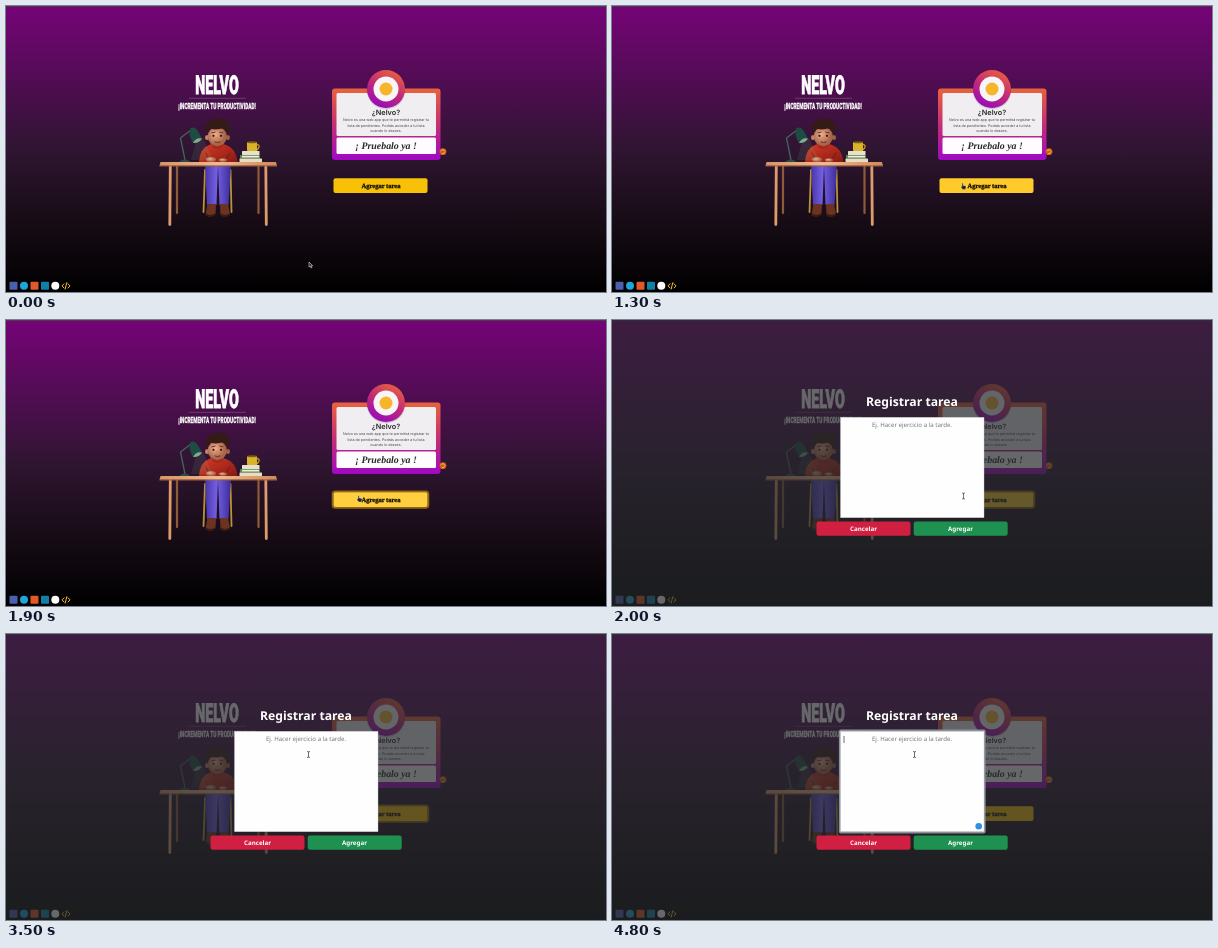
Write an HTML page that moves like this. It is 600x286 px and loops after 5.1 s.

```html
<!DOCTYPE html>
<html lang="es">
<head>
<meta charset="utf-8">
<style>
  html, body { margin: 0; width: 100%; height: 100%; overflow: hidden; background: #000; }
  svg { display: block; width: 100%; height: 100%; }
  text { text-anchor: middle; text-rendering: geometricPrecision; }
  .head { font-family: Roboto, sans-serif; font-weight: 900; fill: #fff; stroke: #fff; }
  .card { font-family: Inter, sans-serif; fill: #4a464c; }
  .script { font: italic bold 9.9px "Liberation Serif", serif; fill: #2a2a2a; }
  .display { font: bold 6.5px "Liberation Serif", serif; fill: #160f00; stroke: #160f00; stroke-width: .3; }
  .modal { font-family: "Noto Sans", "Open Sans", sans-serif; font-weight: 700; fill: #fff; }
  .line { fill: none; stroke-linecap: round; stroke-linejoin: round; }
</style>
</head>
<body>
<svg viewBox="0 0 600 286" preserveAspectRatio="none">
  <defs>
    <linearGradient id="sky" x2="0" y2="1"><stop stop-color="#760378"/><stop offset="0.5" stop-color="#2f1531"/><stop offset=".75" stop-color="#170c16"/><stop offset="1" stop-color="#000"/></linearGradient>
    <linearGradient id="warm" x2="0" y2="1"><stop stop-color="#e8623c"/><stop offset=".5" stop-color="#c62f72"/><stop offset="1" stop-color="#a008c6"/></linearGradient>
    <linearGradient id="halo" x1=".75" y1="0" x2=".25" y2="1"><stop stop-color="#e8623c"/><stop offset=".5" stop-color="#c22a78"/><stop offset="1" stop-color="#9408c0"/></linearGradient>
    <linearGradient id="wood" x2="1" y2="0"><stop stop-color="#d99468"/><stop offset=".5" stop-color="#f0b98c"/><stop offset="1" stop-color="#d18a5c"/></linearGradient>
    <linearGradient id="jean" x2="1" y2="0"><stop stop-color="#4635a8"/><stop offset=".45" stop-color="#7460e4"/><stop offset="1" stop-color="#3c2c98"/></linearGradient>
    <linearGradient id="wool" x2="1" y2="1"><stop stop-color="#dc3c26"/><stop offset="1" stop-color="#861a14"/></linearGradient>
    <radialGradient id="skin" cx=".4" cy=".4"><stop stop-color="#eeb08c"/><stop offset="1" stop-color="#a9654a"/></radialGradient>
  </defs>

  <rect width="600" height="286" fill="url(#sky)"/>
  <rect width="600" height="1" fill="#4b3a4d"/>

  <g class="head" transform="translate(211 0) scale(.55 1)">
    <text y="88.300" font-size="26" stroke-width=".9">NELVO</text>
    <text y="103.400" font-size="8.600" stroke-width=".3">¡INCREMENTA TU PRODUCTIVIDAD!</text>
  </g>
  <path d="M183 92.300H240" stroke="#7d4f80" stroke-width=".7"/>

  <!-- desk scene -->
  <g class="line" stroke="#b8923a" stroke-width="1.800">
    <path d="M199 164L197.500 206M224.500 164L225.500 206"/>
  </g>
  <g class="line" stroke-width="2.200">
    <path d="M171 160V207M252.500 160V207" stroke="#8f5a38"/>
    <path d="M164.300 160L163.800 218.500M259.800 160L260.300 218.500" stroke="#dc9c6c" stroke-width="2.800"/>
  </g>
  <path d="M199 159H212L210.500 199H201ZM212 159H225L222.500 199H213.500Z" fill="url(#jean)"/>
  <path d="M201.500 198H210L209.500 208Q205 213 199.500 209ZM214 198H222L224 208Q219 213 214.500 209Z" fill="#6d3322"/>
  <path d="M199.500 207Q204 211 209.500 207V209Q204 213 199.500 209ZM214.500 207Q219 211 224 207V209Q219 213 214.500 209Z" fill="#3b1a12"/>
  <path d="M203 139Q211 135 220 139Q230 142 231.500 156H193Q194 142 203 139Z" fill="url(#wool)"/>
  <path d="M206 137Q211 143 217 137L217 141Q211 145 206 141Z" fill="#a52a1c"/>
  <path class="line" d="M200 147L203 153M224 147L220 153" stroke="#74150f" stroke-width=".9"/>
  <ellipse cx="201" cy="131.500" rx="2" ry="2.600" fill="#c98262"/>
  <ellipse cx="222" cy="131.500" rx="2" ry="2.600" fill="#a06243"/>
  <ellipse cx="211.300" cy="130.500" rx="9.600" ry="9.700" fill="url(#skin)"/>
  <path d="M201 128.500Q197.500 119 203 116.500Q205 112 212 113.300Q220 112 222.500 118Q225 123 221.500 129Q221 123.500 216 122.500Q207 124.500 203.500 122Q202.500 126 201 128.500Z" fill="#351b16"/>
  <g fill="#241512"><circle cx="207.500" cy="129.800" r="1.100"/><circle cx="215" cy="129.800" r="1.100"/></g>
  <path class="line" d="M205.800 126.800L209 126.200M213.700 126.200L216.800 126.800M209 136Q211.500 137.200 214 136" stroke="#4a2118" stroke-width=".8"/>
  <circle cx="211" cy="132.500" r="1.700" fill="#d58562"/>
  <ellipse cx="205" cy="153.500" rx="5" ry="2.500" fill="url(#skin)"/>
  <ellipse cx="217" cy="154" rx="4" ry="1.800" fill="url(#skin)"/>
  <path d="M190 136L185 154H207L197 132Z" fill="#7fd0a0" opacity=".1"/>
  <path class="line" d="M179 154L174.500 132L185 124" stroke="#44645c" stroke-width="1.300"/>
  <path d="M184 122.500Q189 119 193 127L196 133Q192 137.500 187 137Q182 129 184 122.500Z" fill="#1f4c42"/>
  <path d="M187 137Q190 131 196 132.500Q193 137.500 187 137Z" fill="#7fae8c"/>
  <path d="M173 156Q178.500 150.500 184.500 156Z" fill="#2b4a45"/>
  <path d="M241 136H251V146H243Q241 146 241 144Z" fill="#d9b32a"/>
  <path class="line" d="M251 138.500Q255 139 251.500 143.500" stroke="#c99a18" stroke-width="1.300"/>
  <ellipse cx="246" cy="136.300" rx="5" ry="1" fill="#7a5a14"/>
  <rect x="236" y="145" width="17.500" height="4" rx=".6" fill="#e9e1cd"/>
  <rect x="234" y="149" width="20" height="3.500" rx=".6" fill="#4f8d52"/>
  <rect x="236" y="149.800" width="17" height="1.700" fill="#f3eddc"/>
  <rect x="233.500" y="152.500" width="22.500" height="4" rx=".6" fill="#e9dcc0"/>
  <path d="M154.500 156H270L271 159.800H153.500Z" fill="url(#wood)"/>
  <path d="M153.500 159.600H271V160.600H153.500Z" fill="#9a5f3a"/>

  <!-- info card -->
  <rect x="326" y="82.500" width="108.500" height="71.500" rx="3" fill="url(#warm)"/>
  <rect x="330.500" y="87" width="99.500" height="43" rx="1.500" fill="#f1eef1"/>
  <rect x="330.500" y="131.500" width="99.500" height="16.500" rx="1.500" fill="#fefcfe"/>
  <circle cx="380" cy="84" r="19.300" fill="#000" opacity=".15"/>
  <circle cx="380" cy="83" r="19" fill="url(#halo)"/>
  <circle cx="380" cy="83" r="12.500" fill="#f8f5f8"/>
  <circle cx="380" cy="83" r="6.500" fill="#f7b52c"/>
  <g class="card" font-size="3.650">
    <text x="380" y="109.300" font-size="7.300" font-weight="600" fill="#2b272d">¿Nelvo?</text>
    <text x="380" y="115.300">Nelvo es una web app que te permitirá registrar tu</text>
    <text x="380" y="120.800">lista de pendientes. Podrás acceder a tu lista</text>
    <text x="380" y="126.200">cuando lo desees.</text>
  </g>
  <text class="script" x="380" y="142.500">¡ Pruebalo ya !</text>
  <circle cx="437" cy="145.700" r="3.400" fill="#cf5a22"/>
  <path class="line" d="M434.800 144.700Q437 142.200 439 145.200M436 148L438.500 146.700" stroke="#f4c23c" stroke-width="1"/>

  <rect id="ring" x="326.600" y="171.500" width="95.800" height="16.400" rx="2.800" fill="none" stroke="#d9a406" stroke-width="1.800"/>
  <rect id="add" x="327.500" y="172.300" width="94" height="14.800" rx="2"/>
  <text class="display" x="375" y="182">Agregar tarea</text>

  <!-- footer links -->
  <rect x="3.500" y="275.800" width="8" height="8" rx="1" fill="#4a5fae"/>
  <circle cx="18" cy="279.800" r="4" fill="#1fa6d8"/>
  <rect x="24.500" y="275.800" width="8" height="8" rx="1" fill="#e1582a"/>
  <rect x="35" y="275.800" width="8" height="8" rx="1" fill="#1280a4"/>
  <circle cx="49.300" cy="279.800" r="4" fill="#fff"/>
  <path class="line" d="M58 277.800L56 279.900L58 282M62 277.800L64 279.900L62 282M60.800 276.700L59.200 283" stroke="#f5c22b" stroke-width="1"/>

  <g id="modal" class="modal">
    <rect width="600" height="286" fill="#26282b" opacity=".7"/>
    <text x="300" y="86" font-size="12.200" font-weight="600">Registrar tarea</text>
    <rect id="focus" x="227.900" y="96.500" width="144.700" height="102" rx="1" fill="none" stroke="#8b9099" stroke-width="2"/>
    <rect x="228.500" y="97.300" width="143.500" height="100.400" fill="#fefefe" stroke="#c9c9c9" stroke-width=".4"/>
    <text x="300" y="107.400" font-size="6.100" font-weight="400" fill="#757575">Ej. Hacer ejercicio a la tarde.</text>
    <path id="caret" d="M232 102V109" stroke="#333" stroke-width=".7"/>
    <circle id="badge" cx="366.700" cy="192.200" r="3.300" fill="#2f8fe0"/>
    <rect x="204.500" y="201.500" width="94" height="14.300" rx="2.300" fill="#d01f40"/>
    <rect x="301.700" y="201.500" width="94" height="14.300" rx="2.300" fill="#1e9150"/>
    <text x="251.500" y="210.900" font-size="6.200">Cancelar</text>
    <text x="348.500" y="210.900" font-size="6.200">Agregar</text>
  </g>

  <g id="cursor" stroke-linejoin="round">
    <path id="arrow" d="M0 0V5L1.200 4L2.100 6L3 5.600L2.200 3.700H3.700Z" fill="#222" stroke="#ddd" stroke-width=".6"/>
    <path id="hand" d="M1 .4Q1.700 -.3 2.200 .4V2.400L4.600 3Q5.200 3.300 5 4.500L4.400 6.400H1.700L-.3 3.800Q.2 3 1 3.700Z" fill="#222" stroke="#ddd" stroke-width=".4"/>
    <path id="beam" class="line" d="M-1 -3Q0 -3 0 -2.300Q0 -3 1 -3M0 -2.300V2.300M-1 3Q0 3 0 2.300Q0 3 1 3" stroke="#333" stroke-width=".7"/>
  </g>
</svg>
<script>
const LOOP = 5100, STEP = 100;
const $ = id => document.getElementById(id);
const ramp = (t, from, to) => Math.min(1, Math.max(0, (t - from) / (to - from)));
const mix = (a, b, k) => a.map((v, i) => v + (b[i] - v) * k);
const show = (id, opacity) => $(id).setAttribute('opacity', +opacity);

// time, x, y of the pointer
const pointer = [
  [0, 303, 256], [400, 303, 256], [600, 307, 248], [800, 307, 248], [900, 310, 242],
  [1000, 321, 226], [1100, 336, 203], [1200, 346, 185], [1300, 349, 177],
  [1500, 351, 176], [1900, 351, 175.5], [2000, 351.5, 176], [2800, 351.5, 176],
  [2900, 347, 171], [3000, 336, 158], [3100, 323, 143], [3200, 311, 130],
  [3300, 304, 123], [3400, 302.5, 120.5], [LOOP, 302.5, 120.5]
];

function pointerAt(t) {
  const i = pointer.findIndex(p => p[0] > t);
  const a = pointer[i - 1], b = pointer[i];
  return mix(a, b, ramp(t, a[0], b[0])).slice(1);
}

function draw(now) {
  const t = Math.floor(now % LOOP / STEP) * STEP;
  const open = t >= 2000, over = t >= 1200 && !open;
  const hover = ramp(t, 1100, 1300) * (1 - ramp(t, 1900, 2100));
  const press = ramp(t, 1500, 1700) * (1 - ramp(t, 1900, 2100));
  const fill = mix(mix([248, 193, 8], [255, 202, 44], hover), [255, 207, 64], press);
  $('add').setAttribute('fill', `rgb(${fill.map(Math.round)})`);
  show('ring', .6 * ramp(t, 1500, 1800) * (1 - ramp(t, 3500, 3800)));

  show('modal', open);
  show('focus', ramp(t, 3500, 3800));
  show('caret', t >= 3600 && t < 4200 || t >= 4800);
  show('badge', t >= 4200);

  $('cursor').setAttribute('transform', `translate(${pointerAt(t)})`);
  show('arrow', !open && !over);
  show('hand', over);
  show('beam', open);
}

const start = performance.now();
(function tick() {
  draw(performance.now() - start);
  requestAnimationFrame(tick);
})();
</script>
</body>
</html>
```
